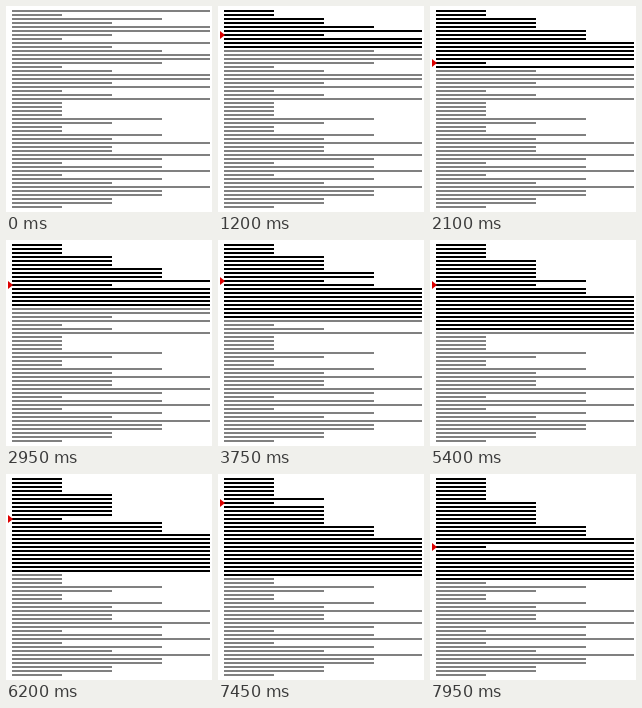
Write an HTML page with a canvas that moves like this. It is 206x206 px and loops after 8000 ms.

```html
<!DOCTYPE html>
<html lang="en">
<head>
<meta charset="utf-8">
<title>Insertion sort</title>
<style>
  html, body { margin: 0; width: 100%; height: 100%; overflow: hidden; background: #fff; }
  canvas { display: block; width: 206px; height: 206px; }
</style>
</head>
<body>
<canvas width="206" height="206"></canvas>
<script>
const STEP_MS = 50, STEPS = 160, PITCH = 4;
const barEnds = { 1: 56, 2: 106, 3: 156, 4: 204 };
const shuffled = [...'41324421423443124424124111132113242243134132433221'];
const ctx = document.querySelector('canvas').getContext('2d');

// Every comparison of the insertion sort is one step; marker is the slot compared.
function recordSteps(values) {
  const steps = [{ values: [...values], sorted: 0, marker: -1 }];
  for (let i = 1; i < values.length; i++) {
    let swapped = true;
    for (let j = i - 1; j >= 0 && swapped; j--) {
      swapped = values[j] > values[j + 1];
      if (swapped) [values[j], values[j + 1]] = [values[j + 1], values[j]];
      steps.push({ values: [...values], sorted: i + 1, marker: j });
    }
  }
  return steps.slice(0, STEPS);
}

function draw({ values, sorted, marker }) {
  ctx.fillStyle = '#fff';
  ctx.fillRect(0, 0, 206, 206);
  values.forEach((value, row) => {
    ctx.fillStyle = row < sorted ? '#000' : '#808080';
    ctx.fillRect(6, row * PITCH + 4, barEnds[value] - 6, 2);
  });
  if (marker < 0) return;
  const y = marker * PITCH + 5;
  ctx.fillStyle = '#d00';
  ctx.beginPath();
  ctx.moveTo(2, y - 4);
  ctx.lineTo(7, y);
  ctx.lineTo(2, y + 4);
  ctx.fill();
}

const steps = recordSteps(shuffled);
function tick() {
  draw(steps[Math.floor(performance.now() / STEP_MS) % STEPS]);
  requestAnimationFrame(tick);
}
tick();
</script>
</body>
</html>
```
